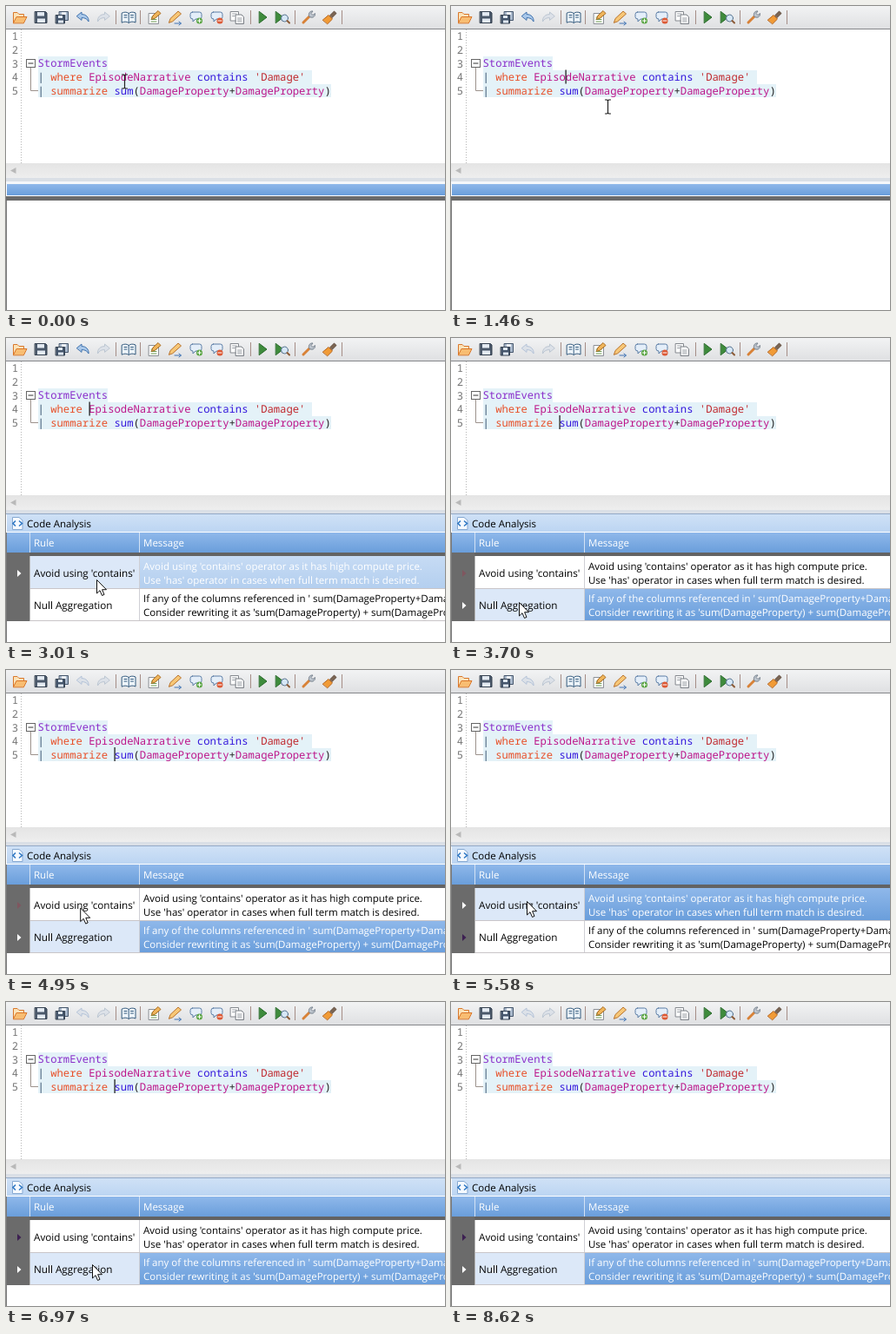
Recreate the animation shown at these times as an HTML page. Size 505x350 px, loop 8860 ms.

```html
<!DOCTYPE html>
<html lang="en">
<head>
<meta charset="utf-8">
<title>Code analysis</title>
<style>
html, body { margin: 0; width: 100%; height: 100%; overflow: hidden; background: #fff; }
svg { display: block; width: 505px; height: 350px; }
text { white-space: pre; text-rendering: geometricPrecision; }
.ui { font-family: "Open Sans", "Noto Sans", sans-serif; font-size: 11.5px; }
.rule { font-size: 11.7px; }
.code { font-family: "Noto Sans Mono", "DejaVu Sans Mono", monospace; font-size: 12.22px; }
.table { fill: #8a2fcb; } .col { fill: #bd168a; } .op { fill: #e8512a; }
.fn { fill: #3518dc; } .str { fill: #c0282e; } .pun { fill: #222; } .pipe { fill: #2f4a66; }
</style>
</head>
<body>
<svg viewBox="0 0 505 350" xmlns="http://www.w3.org/2000/svg">
<defs>
  <linearGradient id="bar" x2="0" y2="1"><stop stop-color="#f2f3f4"/><stop offset="1" stop-color="#dfe0e2"/></linearGradient>
  <linearGradient id="head" x2="0" y2="1"><stop stop-color="#8fb8ea"/><stop offset="1" stop-color="#6a9edb"/></linearGradient>
  <linearGradient id="idle" x2="0" y2="1"><stop stop-color="#c6dbf4"/><stop offset="1" stop-color="#b4cfef"/></linearGradient>
  <linearGradient id="title" x2="0" y2="1"><stop stop-color="#cfe1f6"/><stop offset="1" stop-color="#bcd5f2"/></linearGradient>
  <linearGradient id="track" x2="0" y2="1"><stop stop-color="#e4e4e4"/><stop offset="1" stop-color="#eee"/></linearGradient>
  <path id="turn" d="M81.500 11.500L87 7V9.500C92 9.500 95.500 13 95 18C93.500 15 91 13.500 87 13.500V16Z"/>
  <path id="bubble" d="M214.500 7H222.500Q225 7 225 9.500V12.500Q225 15 222.500 15H218L215 18V15Q212 15 212 12.500V9.500Q212 7 214.500 7Z" fill="#e4eef9" stroke="#5c7ea6"/>
  <path id="play" d="M291.500 6.500L300 13L291.500 19.500Z" fill="#3e8b3c" stroke="#286a2a"/>
</defs>
<rect width="505" height="350" fill="#fff"/>

<!-- toolbar -->
<rect width="505" height="26" fill="url(#bar)"/>
<rect y="26" width="505" height="1" fill="#85878a"/>
<path d="M126.500 5V21M154.500 5V21M281.500 5V21M332.500 5V21M386.500 5V21" stroke="#a58d86"/>
<g stroke-linejoin="round" stroke-linecap="round">
  <path d="M8.500 19V7.500H13L15 9.500H20.500V12" fill="#fbe3b9" stroke="#d9772b"/>
  <path d="M8.500 19.500L12 12.500H24L20.500 19.500Z" fill="#f8bd72" stroke="#d9772b"/>
  <path d="M33.500 6.500H45.500L47 8V19.500H33.500Z" fill="#4a586a" stroke="#34404f"/>
  <path d="M36 7H44V11.500H36ZM36 14.500H45V19H36Z" fill="#e3eaf2"/>
  <path d="M61.500 6.500H71.500V16.500H61.500Z" fill="#a9b8cb" stroke="#44556b"/><path d="M64 7H69V10H64Z" fill="#eef3f8"/>
  <path d="M57.500 10.500H67.500V20H57.500Z" fill="#44556b" stroke="#34404f"/><path d="M60 11H65V14H60ZM60 16.500H66V19.500H60Z" fill="#dfe8f2"/>
  <use id="undo" href="#turn"/>
  <use href="#turn" transform="translate(200.500) scale(-1 1)" fill="#dce1e8" stroke="#bcc6d2"/>
  <path d="M133.500 8C136.500 6.500 139.500 7 141.200 8.500C143 7 146 6.500 149 8V19C146 17.500 143 18 141.200 19.500C139.500 18 136.500 17.500 133.500 19Z" fill="#eef5fb" stroke="#345a7d"/>
  <path d="M141.200 8.500V19M136 10.500H139M136 13H139M143.500 10.500H146.500M143.500 13H146.500" stroke="#345a7d"/>
  <path d="M164.500 8.500H175.500V20.500H164.500Z" fill="#fff" stroke="#8b8f95"/>
  <path d="M167 13H173M167 15.500H173M167 18H173" stroke="#6c9a52"/>
  <path d="M167.500 15L169 11L175 5.500L178 8.500L171.500 14Z" fill="#f0b65c" stroke="#a86a1d"/>
  <path d="M187.500 19L189 14.500L198 6L201.500 9L192 17.500Z" fill="#f7c777" stroke="#b9722a"/>
  <path d="M194 20H201M199 18L201.500 20L199 22" stroke="#3e73b5" fill="none"/>
  <use href="#bubble"/><use href="#bubble" x="24"/>
  <circle cx="222.500" cy="17" r="3.500" fill="#5ba544"/><path d="M220.500 17H224.500M222.500 15V19" stroke="#fff"/>
  <circle cx="246" cy="17" r="3.500" fill="#dc5935"/><path d="M244 17H248" stroke="#fff"/>
  <path d="M258.500 6.500H267.500V17H258.500Z" fill="#fff" stroke="#85898f"/><path d="M260.500 9H265M260.500 11.500H263" stroke="#9a9fa5"/>
  <path d="M264.500 10H271L273.500 12.500V20.500H264.500Z" fill="#fff" stroke="#777c83"/><path d="M266.500 14H271M266.500 16H271M266.500 18H271" stroke="#9a9fa5"/>
  <use href="#play"/><use href="#play" x="19"/>
  <circle cx="320.500" cy="14" r="4" fill="#d7e8f7" stroke="#55718c"/><path d="M323.500 17L326 19.500" stroke="#8b5a36" stroke-width="2"/>
  <path d="M342 19L350 11" stroke="#d88238" stroke-width="3"/>
  <path d="M348.500 11.500C347.500 8 350 5.500 353 6L351 8.500L353 10.500L355.500 8.500C356 12 353 14 350.500 13Z" fill="#bcc4cd" stroke="#77818d"/>
  <path d="M372.500 11L377.500 6L380 8.500L375 13.500Z" fill="#7b6553" stroke="#5d4a3b"/>
  <path d="M364.500 16L371 10.500L375.500 15L370 20.500Z" fill="#f19b36" stroke="#b7661f"/>
</g>

<!-- editor -->
<path d="M37 58H117V74H352V90H374V105H37Z" fill="#e4f2f8"/>
<path d="M17.500 27V181" stroke="#b5b5b5" stroke-dasharray="1 2"/>
<g class="code" id="numbers" fill="#777"></g>
<path d="M28.500 71V97.500H37" fill="none" stroke="#9c928c"/>
<rect x="23.500" y="61.500" width="10" height="9" fill="#fff" stroke="#666"/><path d="M25.500 66H31.500" stroke="#333"/>
<g class="code">
  <text x="36.500" y="70" class="table">StormEvents</text>
  <text x="36.500" y="86"><tspan class="pipe">| </tspan><tspan class="op">where </tspan><tspan class="col">EpisodeNarrative </tspan><tspan class="fn">contains </tspan><tspan class="str">'Damage'</tspan></text>
  <text x="36.500" y="102"><tspan class="pipe">| </tspan><tspan class="op">summarize </tspan><tspan class="fn">sum</tspan><tspan class="pun">(</tspan><tspan class="col">DamageProperty</tspan><tspan class="pun">+</tspan><tspan class="col">DamageProperty</tspan><tspan class="pun">)</tspan></text>
</g>
<rect id="caret" width="1.200" height="16" fill="#111"/>
<rect y="181" width="505" height="17" fill="url(#track)"/>
<path d="M5 189.500L11.500 186V193Z" fill="#b9b9b9"/>
<rect y="198" width="505" height="7" fill="#f5f7fa"/><rect y="198" width="505" height="4" fill="#dadfe6"/>

<g id="empty">
  <rect x="1" y="205" width="504" height="13" fill="url(#head)"/>
  <rect y="219" width="505" height="5" fill="#6b6b6b"/>
</g>
<g id="panel" class="ui">
  <rect x="1" y="203" width="504" height="20" fill="url(#title)"/>
  <path d="M0 202.500H505" stroke="#93a9c6"/>
  <path d="M7.500 206.500H15L19 210V220.500H7.500Z" fill="#f6faff" stroke="#86a9d2"/>
  <path d="M11 210.500L8 213.500L11 216.500M15 210.500L18.500 213.500L15 216.500" fill="none" stroke="#2f78c4" stroke-width="1.600"/>
  <text x="24" y="218">Code Analysis</text>
  <rect x="1" y="224" width="504" height="23" fill="url(#head)"/>
  <rect y="247" width="505" height="4" fill="#636363"/>
  <rect y="247" width="27.500" height="79" fill="#6b6b6b"/>
  <g id="grid"></g>
</g>
<path d="M.5 224V350" stroke="#777"/>

<path id="ibeam" d="M-3.500 -8H-1L0 -7L1 -8H3.500M-3.500 8H-1L0 7L1 8H3.500M0 -7V7" fill="none" stroke="#222" stroke-width="1.200"/>
<path id="arrow" d="M.5 .5V16L4 12.700L6.500 18.500L9 17.400L6.600 11.700H11.500Z" fill="#fff" stroke="#111"/>
</svg>
<script>
const LOOP = 8860, BLINK = 540, STEP = 76;
const OPEN = 1860, WIDEN = 2320, FOCUS = 3630, LEAVE = 8140;
const $ = id => document.getElementById(id);
const show = (id, on) => $(id).setAttribute("visibility", on ? "visible" : "hidden");
const set = (id, attrs) => Object.entries(attrs).forEach(([k, v]) => $(id).setAttribute(k, v));

$("numbers").innerHTML = [0, 1, 2, 3, 4]
  .map(i => `<text x="6.800" y="${39 + 15.750 * i}">${i + 1}</text>`).join("");

// Column: left edge, heading, then the lines of each row.
const narrow = [
  [28, "Rule", ["Avoid using 'contai..."], ["Null Aggregation"]],
  [148, "Message", ["Avoid using 'contai...", "Use 'has' operator i..."],
    ["If any of the colum...", "Consider rewriting..."]],
  [268, "Code", ["EpisodeNarrative c..."], ["sum(DamageProp..."]],
  [388, "Category", ["Performance"], ["Correctness"]]
];
const wide = [
  [28, "Rule", ["Avoid using 'contains'"], ["Null Aggregation"]],
  [154, "Message",
    ["Avoid using 'contains' operator as it has high compute price.",
     "Use 'has' operator in cases when full term match is desired."],
    ["If any of the columns referenced in ' sum(DamageProperty+DamageProperty)' are null",
     "Consider rewriting it as 'sum(DamageProperty) + sum(DamageProperty)'"]]
];

const label = (x, y, s, fill, kind = "") => `<text x="${x}" y="${y}" fill="${fill}" class="${kind}">${s}</text>`;
const box = (x, y, w, fill) => `<rect x="${x}" y="${y}" width="${w}" height="37" fill="${fill}"/>`;

function drawGrid(cols, selected, active, marks) {
  let out = `<path d="M27.500 224V247" stroke="#d3e2f5"/>`;
  for (const i of [0, 1]) {
    const y = 251 + 37.500 * i, mid = 271 + 37 * i, on = i === selected;
    out += box(28, y, 477, on ? `url(#${active ? "head" : "idle"})` : "#fff");
    if (on) out += box(28, y, cols[1][0] - 28.500, "#dce8f8");
    if (marks[i]) out += `<path d="M13 ${mid - 4}L17.500 ${mid}L13 ${mid + 4}Z" fill="${marks[i]}"/>`;
    cols.forEach((c, k) => {
      const lines = c[2 + i], top = mid + 4 - 8 * (lines.length - 1);
      lines.forEach((s, n) => out += label(c[0] + 4, top + 16 * n, s, on && k ? "#fff" : "#000", k ? "" : "rule"));
    });
  }
  cols.forEach(([x, name], k) => {
    out += label(x + 4, 240, name, "#fff");
    if (k) out += `<path d="M${x - .5} 224V247" stroke="#d3e2f5"/><path d="M${x - .5} 251V325" stroke="#cfcfd4"/>`;
  });
  return out + `<path d="M28 288.500H505M28 325.500H505" stroke="#c9c5c8"/>`;
}

// Each click picks a row, moves the caret to its code and restarts the blinking.
const clicks = [{ t: OPEN, row: 0 }, { t: FOCUS, row: 1 }, { t: 5030, row: 0 }, { t: 6970, row: 1 }];
const spots = [{ x: 95.500, y: 73.500 }, { x: 124.500, y: 89 }];
const idle = { t: 380, x: 131.500, y: 73.500 };

// Mouse moves: begin, end, where to.
const moves = [
  [1004, 1160, 180.500, 116], [2394, 2550, 214, 165], [2550, 3010, 104, 278], [3010, 3320, 78, 304],
  [4644, 5030, 87, 266], [5580, 5810, 99, 302], [7064, 7290, 99, 305]
];

function mouseAt(t) {
  let x = 136.500, y = 87;
  for (const [begin, end, toX, toY] of moves) {
    if (t < begin) break;
    const p = Math.min(1, Math.floor((t - begin) / STEP) / Math.floor((end - begin) / STEP));
    x += (toX - x) * p;
    y += (toY - y) * p;
  }
  return { x, y };
}

let shown = "";
function draw(t) {
  const past = clicks.filter(c => c.t <= t), click = past[past.length - 1];
  const row = click ? click.row : 0, active = t >= FOCUS;
  const { x, y } = click ? spots[row] : idle;
  show("caret", Math.floor((t - (click || idle).t) / BLINK) % 2 === 0);
  set("caret", { x, y });

  const m = mouseAt(t), inText = m.y < 181;
  show("ibeam", inText && t < LEAVE);
  show("arrow", !inText && t < LEAVE);
  set(inText ? "ibeam" : "arrow", { transform: `translate(${m.x} ${m.y})` });

  set("undo", active ? { fill: "#dce1e8", stroke: "#b4c3d8" } : { fill: "#a9c8ea", stroke: "#4173ad" });
  show("empty", t < OPEN);
  show("panel", t >= OPEN);

  const dim = past.length === 2 ? "#80565f" : "#3d2052";
  const marks = [0, 1].map(i => i === row ? "#fff" : active ? dim : "");
  const key = [t >= WIDEN, row, active, marks].join();
  if (key !== shown) {
    shown = key;
    $("grid").innerHTML = drawGrid(t >= WIDEN ? wide : narrow, row, active, marks);
  }
}

const start = performance.now();
function tick() {
  draw((performance.now() - start) % LOOP);
  requestAnimationFrame(tick);
}
tick();
</script>
</body>
</html>
```
